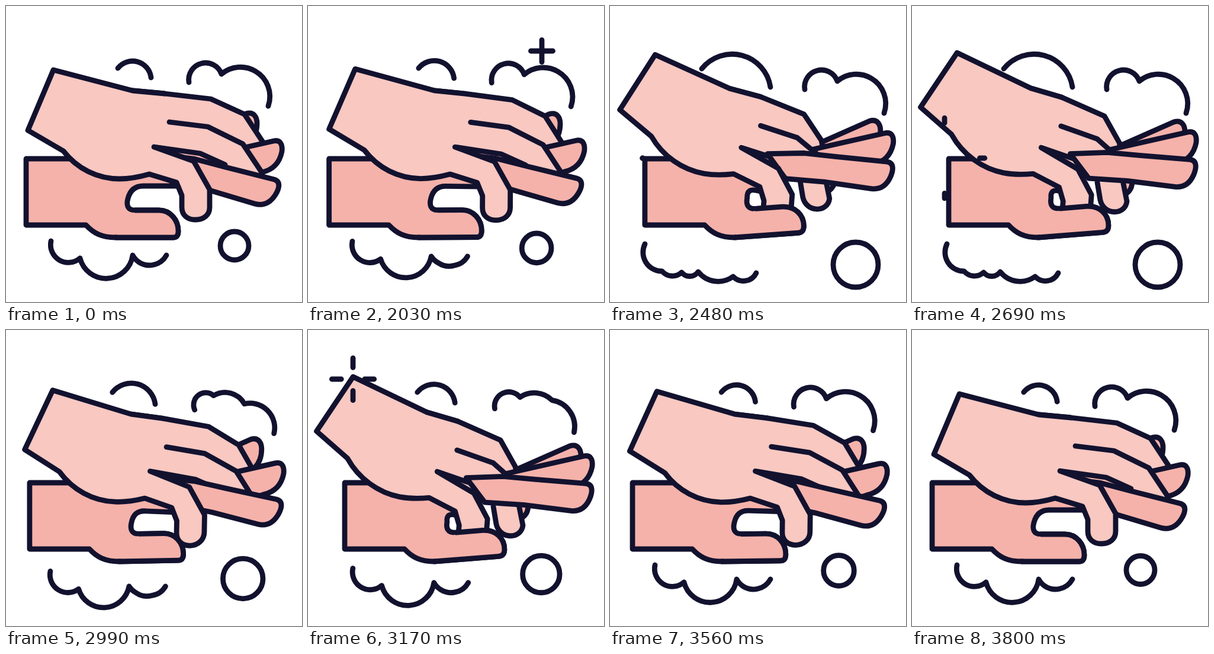
An HTML page that plays this animation: 500x500 px, repeating every 3830 ms.

```html
<!DOCTYPE html>
<html lang="en">
<head>
<meta charset="utf-8">
<title>Hand washing</title>
<style>
  html, body { margin: 0; width: 100%; height: 100%; overflow: hidden; background: #fff; }
  svg { display: block; width: 100vw; height: 100vh; }
  path, circle { stroke-width: 8.8; stroke-linecap: round; stroke-linejoin: round; }
</style>
</head>
<body>
<svg id="stage" viewBox="0 0 500 500"></svg>
<script>
const INK = '#12122f', LIGHT = '#f8c8c1', DARK = '#f5b2aa';
const LOOP = 3830, REST = 2030, STEP = 30;
const stage = document.getElementById('stage');

function add(tag, fill, stroke = INK) {
  const el = document.createElementNS('http://www.w3.org/2000/svg', tag);
  el.setAttribute('fill', fill);
  el.setAttribute('stroke', stroke);
  return stage.appendChild(el);
}

const clamp = (x, lo, hi) => Math.min(hi, Math.max(lo, x));
const mix = (a, b, k) => a + (b - a) * k;

// Linear rise from a to b, hold until c, linear fall until d.
const pulse = (u, a, b, c, d) => clamp(Math.min((u - a) / (b - a), (d - u) / (d - c)), 0, 1);

// Growth of the foam: steady rise, then an exponential fall.
const puff = (u, decay) => Math.min(1, u / 480) * Math.exp(-Math.max(0, u - 690) / decay);

function turn(x, y, degrees) {
  const a = degrees * Math.PI / 180, c = Math.cos(a), s = Math.sin(a);
  return [x * c - y * s, x * s + y * c];
}

// Upper hand: tilts about the knuckle while the fingers curl in.
function tilt(x, y, p) {
  x -= 214;
  y -= 143;
  const e = Math.max(0, x - 115);
  const bx = x + p * (0.1 * Math.max(0, y - 110) - 0.0045 * e * e);
  const by = y + p * e * (0.6 - 0.0075 * y);
  const [rx, ry] = turn(bx, by, 11 * p);
  return [rx + 214 - 13 * p, ry + 143 - 4 * p];
}

// Lower hand: slides right while the thumb closes.
function pinch(x, y, p) {
  const k = Math.max(0, x - 185) * clamp(y - 322, -18, 9);
  return [x + p * (28 + 0.0135 * k), y - p * 0.01 * k];
}

// Lowest finger: swings up.
function swing(x, y, p) {
  const [rx, ry] = turn(x - 300, y - 270, -9.5 * p);
  return [rx + 300 + 15 * p, ry + 270 - 8 * p];
}

const slide = (dx, dy) => (x, y, p) => [x + dx * p, y + dy * p];
const reach = slide(-70, 42);

// Hand parts from back to front: movement, fill, outline, stroke.
const PARTS = [
  [reach, DARK, 'M420 234C449 234 449 278 420 278'],
  [reach, LIGHT, 'M383 256L388 286C394 312 430 312 433 288L426 253'],
  [slide(37, 14), DARK, 'M303 227L405 182C420 177 424 190 424 198C424 212 420 222 412 230'],
  [tilt, LIGHT, 'M214 143L268 148L346 157L403 183L434 230L400 250L330 250L240 230', 'none'],
  [tilt, 'none', 'M214 143L268 148L346 157L403 183L434 230'],
  [slide(14, -15), DARK,
    'M310 260L452 228C466 225 467 238 466 246C462 266 450 277 432 281L390 295'],
  [tilt, LIGHT, 'M276 196L341 204L400 233L432 283L395 290L330 275L250 238', 'none'],
  [tilt, 'none', 'M276 196L341 204L400 233L432 281'],
  [tilt, DARK, 'M250 238L328 249L370 268'],
  [pinch, DARK, 'M34 258L34 370L135 370C148 384 162 391 185 391L282 391C289 391 291 387 291 380' +
    'C291 362 278 345 258 345L218 345C205 345 203 336 206 325C210 310 219 304 232 304' +
    'L292 304L280 268L150 258Z'],
  [swing, DARK, 'M255 250L317 258L370 272L453 293C466 297 460 311 455 319' +
    'C446 333 434 338 420 334L343 311L279 296Z'],
  [tilt, LIGHT, 'M268 148L214 143L80 108L37 210L97 245C120 275 155 292 192 292' +
    'C212 292 228 288 242 284L288 298L297 320L297 340C297 354 307 361 320 361' +
    'C334 361 344 353 344 340L344 310L317 262L250 238'],
  [pinch, DARK, 'M185 391L282 391C289 391 291 387 291 380C291 362 278 345 258 345L218 345']
];

const foamLeft = add('path', 'none');
const foamRight = add('path', 'none');
const foamLow = add('path', 'none');
const bubble = add('circle', 'none');
const parts = PARTS.map(([move, fill, shape, stroke]) =>
  ({ move, shape, el: add('path', fill, stroke) }));
const sparks = add('path', 'none');

const moved = (shape, move, p) =>
  shape.replace(/(\d+) (\d+)/g, (_, x, y) => move(+x, +y, p).map(v => v.toFixed(2)).join(' '));

// Chain of arcs from a start point and [radius, x, y] links.
const arcs = (x, y, links, sweep) =>
  `M${x} ${y}` + links.map(([r, a, b]) => `A${r} ${r} 0 0 ${sweep} ${a} ${b}`).join('');

function drawFoam(u) {
  const size = pulse(u, 0, 480, 690, 1690);
  const g = puff(u, 230);
  const dent = pulse(u, 690, 990, 990, 1380);

  foamLeft.setAttribute('d', arcs(189 - 34 * g, 105 + g,
    [[31.5 + 34 * g, 245 + 26 * g, 121 + 16 * g]], 1));

  const drift = (g + size) / 2;
  foamRight.setAttribute('d', arcs(309, 129, [
    [28.5 - 8 * dent, 364 - 23 * dent, 115 - 10 * dent],
    [49.5 - 12 * dent, 421 - 28 * dent, 110 + 9 * dent],
    [49.5 - 8 * dent, 443, 169]
  ], 1));
  foamRight.setAttribute('transform', `translate(${20 * drift} ${12 * drift})`);

  // Three round lumps break up into five small ones.
  const k = puff(u, 110);
  const link = (r0, x0, y0, r1, x1, y1) => [mix(r0, r1, k), mix(x0, x1, k), mix(y0, y1, k)];
  foamLow.setAttribute('d', arcs(76 - 17 * k, 397 + 5 * k, [
    link(30, 125, 426, 32, 88, 448),
    link(45.4, 214, 421, 23, 121, 450),
    link(32.4, 225, 433, 17.5, 149, 449),
    link(32.4, 250, 437, 43, 208, 457),
    link(32.4, 271, 421, 24, 247, 451)
  ], 0));
  foamLow.setAttribute('transform', `translate(0 ${10 * dent})`);

  bubble.setAttribute('cx', 386 + 29 * size * size);
  bubble.setAttribute('cy', 405 + 32 * easeOut(g));
  bubble.setAttribute('r', 24 + 14 * size);
}

// Sparkles: centre and start time.
const SPARKS = [[395, 76, -12], [55, 257, 479], [76, 83, 1083]];
const REACH = 78, FLY = 330, LAG = 0.128;

function easeOut(x) {
  return 1 - (1 - clamp(x, 0, 1)) ** 2;
}

function sparkPath(u) {
  let d = '';
  for (const [x, y, start] of SPARKS) {
    const k = (u - start) / FLY;
    const from = REACH * easeOut(k - LAG), to = REACH * easeOut(k);
    if (u <= 0 || k <= 0 || from >= REACH) continue;
    for (const [dx, dy] of [[1, 0], [-1, 0], [0, 1], [0, -1]])
      d += `M${x + dx * from} ${y + dy * from}L${x + dx * to} ${y + dy * to}`;
  }
  return d;
}

function draw(u) {
  // The hands rub together twice.
  const p = Math.max(pulse(u, 0, 540, 690, 1070), pulse(u, 960, 1170, 1200, 1620));
  for (const { move, shape, el } of parts) el.setAttribute('d', moved(shape, move, p));
  drawFoam(u);
  sparks.setAttribute('d', sparkPath(u));
}

const begin = performance.now();
function tick() {
  const t = (performance.now() - begin) % LOOP;
  draw(t < REST ? 0 : (Math.floor((t - REST) / STEP) + 1) * STEP);
  requestAnimationFrame(tick);
}
tick();
</script>
</body>
</html>
```
